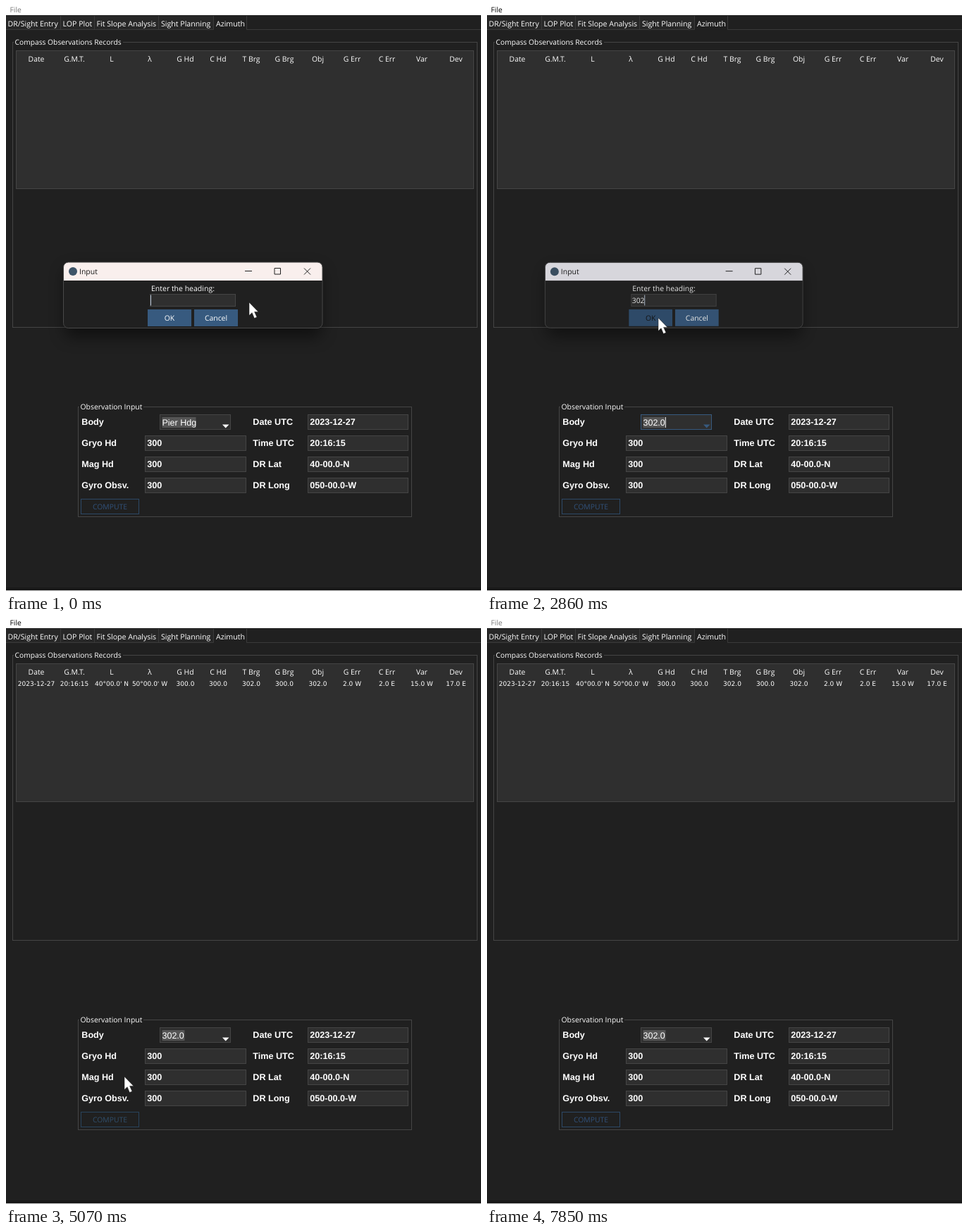
An HTML page that plays this animation: 674x831 px, repeating every 9110 ms.

```html
<!DOCTYPE html>
<html lang="en">
<head>
<meta charset="utf-8">
<title>Compass observations</title>
<style>
html, body { margin: 0; width: 100%; height: 100%; overflow: hidden; background: #202020; }
svg { display: block; width: 100%; height: 100%; }
text { font: 10.5px "Open Sans", "Noto Sans", sans-serif; fill: #fff; text-rendering: geometricPrecision; white-space: pre; }
.bold { font: bold 12.6px "Liberation Sans", Arial, sans-serif; }
.combo { font: 12.5px "Liberation Sans", Arial, sans-serif; }
.cell { font: 9px "DejaVu Sans", Verdana, sans-serif; }
.mid { text-anchor: middle; }
</style>
</head>
<body>
<svg id="stage" viewBox="0 0 674 831" preserveAspectRatio="none">
  <defs>
    <filter id="shadow" x="-20%" y="-60%" width="140%" height="240%"><feGaussianBlur stdDeviation="11"/></filter>
    <clipPath id="dialogShape"><rect x="81.5" y="364" width="367.5" height="93.5" rx="7"/></clipPath>
  </defs>
</svg>
<script>
const LOOP = 9110, STEP = 67;
const stage = document.getElementById('stage');

function add(parent, tag, attrs = {}, content) {
  const node = document.createElementNS('http://www.w3.org/2000/svg', tag);
  set(node, attrs);
  if (content !== undefined) node.textContent = content;
  return parent.appendChild(node);
}
function set(node, attrs) {
  for (const name in attrs) node.setAttribute(name, attrs[name]);
}
const show = (node, on) => set(node, { visibility: on ? 'visible' : 'hidden' });
const group = (parent = stage) => add(parent, 'g');
const text = (parent, x, y, content, cls = '', style = '') =>
  add(parent, 'text', { x, y, class: cls, style }, content);
const fill = (parent, x, y, width, height, color) =>
  add(parent, 'rect', { x, y, width, height, fill: color });
const box = (parent, x, y, width, height, stroke = '#454545', color = '#2f2f2f') =>
  add(parent, 'rect', { x: x + .5, y: y + .5, width: width - 1, height: height - 1, fill: color, stroke });
const line = (parent, d, stroke, extra = {}) =>
  add(parent, 'path', { d, stroke, fill: 'none', ...extra });

function labelFrame(x, y, width, height, label, labelWidth, size) {
  box(stage, x, y, width, height, '#454545', 'none');
  fill(stage, x + 2, y - 2, labelWidth, 5, '#202020');
  text(stage, x + 3.5, y + 4, label, '', `font-size:${size}px`);
}

// Menu and tabs
fill(stage, 0, 0, 674, 831, '#202020');
fill(stage, 0, 0, 674, 13, '#fff');
const fileMenu = text(stage, 5.5, 9, 'File', '', 'font-size:10.3px');
fill(stage, 0, 14, 294, 20, '#272727');
line(stage, 'M0 33.5H294.5V14M341.5 14V33.5H674M77.5 14V33M125.5 14V33M216.5 14V33', '#3a3a3a');
[['DR/Sight Entry', 2.5], ['LOP Plot', 80.5], ['Fit Slope Analysis', 128.5],
 ['Sight Planning', 220], ['Azimuth', 298]].forEach(([name, x]) => text(stage, x, 28.5, name, '', 'font-size:10.6px'));
fill(stage, 0, 826, 674, 4, '#191919');
fill(stage, 0, 830, 674, 1, '#d4d4d4');

// Records table
labelFrame(9, 51, 660, 406, 'Compass Observations Records', 155, 10.25);
const table = box(stage, 14, 63, 650, 197);
const tableEdge = line(stage, 'M14.5 63V260', '#2d4664');
const record = group();
[['Date', '2023-12-27', 43], ['G.M.T.', '20:16:15', 97], ['L', "40°00.0' N", 150], ['λ', "50°00.0' W", 204],
 ['G Hd', '300.0', 254.5], ['C Hd', '300.0', 301], ['T Brg', '302.0', 348], ['G Brg', '300.0', 395],
 ['Obj', '302.0', 442.5], ['G Err', '2.0 W', 491], ['C Err', '2.0 E', 540.5], ['Var', '15.0 W', 590], ['Dev', '17.0 E', 638.5]
].forEach(([head, value, x]) => {
  text(stage, x, 79, head, 'mid', 'font-size:10.4px');
  text(record, x, 95.3, value, 'mid cell');
});

// Observation form
labelFrame(102, 569, 474, 157, 'Observation Input', 91, 10.4);
[['Body', null, 'Date UTC', '2023-12-27'], ['Gryo Hd', '300', 'Time UTC', '20:16:15'],
 ['Mag Hd', '300', 'DR Lat', '40-00.0-N'], ['Gyro Obsv.', '300', 'DR Long', '050-00.0-W']
].forEach(([left, value, right, rightValue], row) => {
  const y = 580 + row * 30, base = y + 15.2;
  text(stage, 107.3, base, left, 'bold');
  if (value) {
    box(stage, 197, y, 144, 22);
    text(stage, 200.3, base, value, 'bold');
  }
  text(stage, 350.3, base, right, 'bold');
  box(stage, 428, y, 143, 22);
  text(stage, 431.3, base, rightValue, 'bold');
});
const combo = box(stage, 218, 580, 101, 22);
const selection = fill(stage, 221.5, 584, 48, 15, '#555');
const comboText = text(stage, 221.5, 595.5, '', 'combo');
const comboCaret = fill(stage, 253, 584, 1, 15, '#ddd');
const comboArrow = add(stage, 'path', { d: 'M307 594.5H316.5L311.7 599.5Z' });
const compute = box(stage, 106, 700, 83, 22);
const computeText = text(stage, 147.5, 715.3, 'COMPUTE', 'mid', 'font-size:10.4px');

// Heading dialog
const dialog = group();
add(dialog, 'rect', { x: 84, y: 374, width: 363, height: 96, rx: 8, fill: '#000', opacity: .5, filter: 'url(#shadow)' });
const face = add(dialog, 'g', { 'clip-path': 'url(#dialogShape)' });
fill(face, 81, 364, 369, 94, '#202020');
const titleBar = fill(face, 81, 364, 369, 26, '#f9efed');
add(dialog, 'rect', { x: 81.5, y: 364, width: 367.5, height: 93.5, rx: 7, fill: 'none', stroke: '#484848' });
add(dialog, 'circle', { cx: 95, cy: 377, r: 6, fill: '#3d5468' });
text(dialog, 104, 381, 'Input', '', 'font-size:10.5px;fill:#1a1a1a');
line(dialog, 'M339 376.5H349M381 372.5H389.5V381H381ZM423 372.5L432 381.5M432 372.5L423 381.5', '#222');
text(dialog, 206, 405, 'Enter the heading:');
box(dialog, 204, 409, 122, 18);
const typed = text(dialog, 205.5, 422.3, '', '', 'font-size:10.4px');
const caret = fill(dialog, 205, 410.5, 1, 15, '#b8c4d6');
const okButton = fill(dialog, 201, 431, 62, 24, '#375a7f');
const okText = text(dialog, 232, 447, 'OK', 'mid', 'font-size:10.4px');
fill(dialog, 267, 431, 62, 24, '#375a7f');
text(dialog, 298, 447, 'Cancel', 'mid', 'font-size:10.4px');

// Pointer
const clickMark = add(stage, 'circle', { r: 10.5, fill: '#c9c81f', opacity: .78 });
const pointer = add(stage, 'path', {
  d: 'M0 0V18.6L4.1 14.7L7.4 22.6L11 21L7.6 13.4H13Z', fill: '#fff', stroke: '#1a1a1a', 'stroke-width': .5
});

const easeIn = p => p * p, easeOut = p => p * (2 - p), smooth = p => p * p * (3 - 2 * p);
// time, x, y, easing into this point
const route = [
  [0, 345, 421], [2123, 345, 421], [2660, 243, 443, smooth], [3253, 243, 443],
  [3920, 163, 715, smooth], [4543, 163, 715], [5070, 168, 650, easeIn], [5480, 79, 96, easeOut],
  [5620, 60, 96], [5753, 60, 96], [6150, 456, 98, easeIn], [6490, 632, 98, easeOut],
  [7243, 632, 98], [7850, 690, 815, smooth], [LOOP, 690, 815]
];

function pointerAt(t) {
  const i = route.findIndex(point => point[0] > t);
  const [t0, x0, y0] = route[i - 1], [t1, x1, y1, ease = p => p] = route[i];
  const steps = Math.max(1, Math.round((t1 - t0) / STEP));
  const p = ease(Math.floor((t - t0) / (t1 - t0) * steps) / steps);
  return [x0 + (x1 - x0) * p, y0 + (y1 - y0) * p];
}

function draw(t) {
  const between = (a, b) => t >= a && t < b;
  const [x, y] = pointerAt(t);
  const over = (left, top, right, bottom) => x >= left && x < right && y >= top && y < bottom;

  set(pointer, { transform: `translate(${x} ${y})` });
  set(clickMark, { cx: x, cy: y });
  show(clickMark, between(2720, 2850) || between(3990, 4190));

  const mainActive = between(2860, 7040);
  fileMenu.style.fill = mainActive ? '#000' : '#777';

  // Dialog: typing, blinking caret, closing
  const count = [320, 850, 1180].filter(start => t >= start).length;
  typed.textContent = '302'.slice(0, count);
  set(caret, { x: 205 + 6 * count });
  show(caret, !(between(450, 710) || between(1310, 1660) || between(2260, 2560)));
  const closing = t >= 2860, late = t >= 2950;
  const scale = late ? .96 : closing ? .995 : 1;
  set(dialog, {
    display: t < 3000 ? 'inline' : 'none',
    opacity: late ? .4 : closing ? .88 : 1,
    transform: `translate(265.3 410.5) scale(${scale}) translate(-265.3 -410.5)`
  });
  set(titleBar, { fill: closing ? '#f1f0f7' : '#f9efed' });
  const okHover = over(201, 431, 263, 455);
  set(okButton, { fill: okHover ? '#305073' : '#375a7f' });
  okText.style.fill = okHover ? '#141414' : '#fff';

  // Body selector
  const comboFocus = between(2860, 3990);
  comboText.textContent = closing ? '302.0' : 'Pier Hdg';
  set(selection, { width: closing ? 32 : 48 });
  set(combo, { stroke: comboFocus ? '#375a7f' : '#454545' });
  set(comboArrow, { fill: comboFocus ? '#375a7f' : '#fff' });
  show(comboCaret, comboFocus && !between(3460, 3760));

  // Compute button
  const computeHover = over(106, 700, 189, 722);
  const computeFocus = between(3990, 7040);
  set(compute, {
    fill: computeHover ? '#375a7f' : '#202020',
    stroke: computeHover && computeFocus ? '#dce4ec' : computeFocus ? '#28435c' : '#2c4866',
    'stroke-dasharray': computeHover && computeFocus ? '1 1' : 'none'
  });
  computeText.style.fill = computeHover ? '#fff' : computeFocus ? '#304f6c' : '#31517a';

  // Table
  show(record, t >= 4190);
  const tableHover = over(14, 63, 664, 260);
  set(table, { stroke: tableHover && t < 5820 ? '#2d4664' : '#454545' });
  show(tableEdge, tableHover);
}

function tick(now) {
  draw(now % LOOP);
  requestAnimationFrame(tick);
}
draw(0);
requestAnimationFrame(tick);
</script>
</body>
</html>
```
